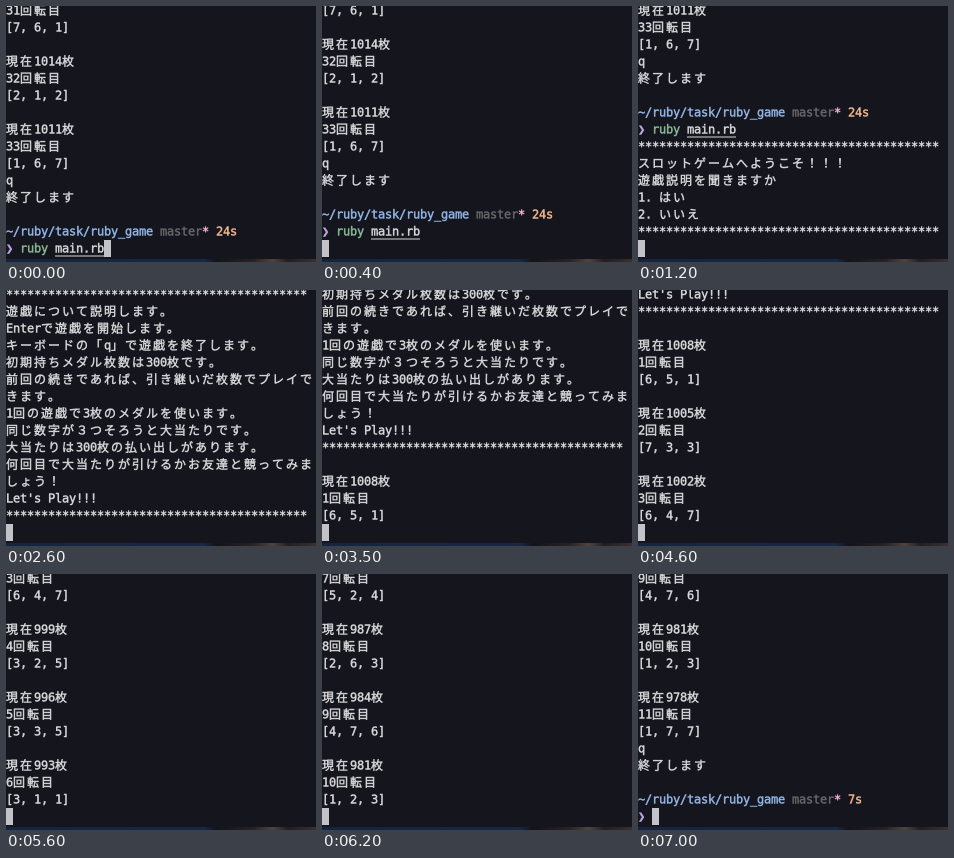
Write an HTML page with a canvas that moves like this. It is 310x256 px and loops after 7.2 s.

```html
<!DOCTYPE html>
<html lang="ja">
<head>
<meta charset="utf-8">
<title>Slot game in a terminal</title>
<style>
  html, body { margin: 0; height: 100%; overflow: hidden; background: #14151d; }
  canvas { display: block; width: 310px; height: 256px; }
</style>
</head>
<body>
<canvas id="screen" width="620" height="512"></canvas>
<script>
const ctx = document.getElementById('screen').getContext('2d');
ctx.scale(2, 2); // double resolution allows half-pixel baselines
ctx.lineWidth = 0.45;
ctx.lineJoin = 'round';
const LOOP = 7200, ROWS = 15, CELL = 7, LINE = 17, TOP = -4, BASELINE = 12.5;
const TEXT = '#d6d6d8', CURSOR = '#c2c2c8', BACK = '#14151d';
const COLORS = { 0: TEXT, 32: '#88b894', 33: '#efb588', 34: '#92b4e4', 35: '#bfa6e2', 90: '#66666a', 95: '#f5aed2' };

const paint = (code, text) => `\x1b[${code}m${text}\x1b[0m`;
const prompt = time => paint(34, '~/ruby/task/ruby_game') + ' ' + paint(90, 'master') +
  paint(95, '*') + ' ' + paint(33, time) + '\n' + paint(35, '❯') + ' ';
const spin = (balance, round, reels) => `現在${balance}枚\n${round}回転目\n[${[...reels].join(', ')}]\n`;
const STARS = '*'.repeat(43) + '\n';
const goodbye = '終了します\n\n';

// Everything written to the terminal, with the time it appears
const output = [
  [0, spin(1017, 31, '761') + '\n' + spin(1014, 32, '212') + '\n' + spin(1011, 33, '167') +
      'q\n' + goodbye + prompt('24s') + paint(32, 'ruby') + ' ' + paint(4, 'main.rb')],
  [400, '\n'],
  [1200, STARS + 'スロットゲームへようこそ！！！\n遊戯説明を聞きますか\n1. はい\n2. いいえ\n' + STARS],
  [2200, '1'],
  [2600, '\n' + STARS + `遊戯について説明します。
Enterで遊戯を開始します。
キーボードの「q」で遊戯を終了します。
初期持ちメダル枚数は300枚です。
前回の続きであれば、引き継いだ枚数でプレイで
きます。
1回の遊戯で3枚のメダルを使います。
同じ数字が３つそろうと大当たりです。
大当たりは300枚の払い出しがあります。
何回目で大当たりが引けるかお友達と競ってみま
しょう！
Let's Play!!!
` + STARS],
  ...[[3500, '651'], [4100, '733'], [4600, '647'], [5100, '325'], [5400, '335'], [5600, '311'],
      [5700, '524'], [5900, '263'], [6000, '476'], [6200, '123'], [6300, '177']]
    .map(([time, reels], i) => [time, '\n' + spin(1008 - 3 * i, i + 1, reels)]),
  [6600, 'q'],
  [7000, '\n' + goodbye + prompt('7s')],
];

function setColor(color) {
  ctx.fillStyle = ctx.strokeStyle = color;
}

// Draws one line and returns the x position after it
function drawLine(line, y) {
  let x = 0, underline = false;
  setColor(TEXT);
  for (const part of line.split(/(\x1b\[\d+m)/)) {
    const code = part.match(/^\x1b\[(\d+)m$/);
    if (code) {
      underline = code[1] === '4';
      setColor(COLORS[code[1]] || TEXT);
      continue;
    }
    const start = x;
    for (const char of part) {
      const wide = char >= '\u3000';
      ctx.font = wide ? '12px "Noto Sans CJK JP", "Noto Sans CJK", sans-serif'
                      : '12px "DejaVu Sans Mono", monospace';
      ctx.fillText(char, x, y + BASELINE);
      ctx.strokeText(char, x, y + BASELINE); // slightly heavier strokes
      x += wide ? 2 * CELL : CELL;
    }
    if (underline) ctx.fillRect(start, y + 15.5, x - start, 1);
  }
  return x;
}

// Sliver of desktop below the window
function drawDesktop() {
  const strip = ctx.createLinearGradient(0, 0, 310, 0);
  [[0, '#14253f'], [.64, '#162844'], [.68, '#14131a'], [.8, '#2a2224'],
   [.86, '#51443f'], [.91, '#241d20'], [1, '#3a3030']].forEach(stop => strip.addColorStop(...stop));
  ctx.fillStyle = strip;
  ctx.fillRect(0, 253, 310, 3);
}

function render(time) {
  ctx.fillStyle = BACK;
  ctx.fillRect(0, 0, 310, 256);
  const lines = output.filter(([at]) => at <= time).map(([, text]) => text).join('').split('\n').slice(-ROWS);
  let x = 0;
  lines.forEach((line, row) => x = drawLine(line, TOP + row * LINE));
  ctx.fillStyle = CURSOR;
  ctx.fillRect(x, TOP + (ROWS - 1) * LINE, CELL, LINE);
  drawDesktop();
}

const start = performance.now();
function tick() {
  render((performance.now() - start) % LOOP);
  requestAnimationFrame(tick);
}
tick();
</script>
</body>
</html>
```
